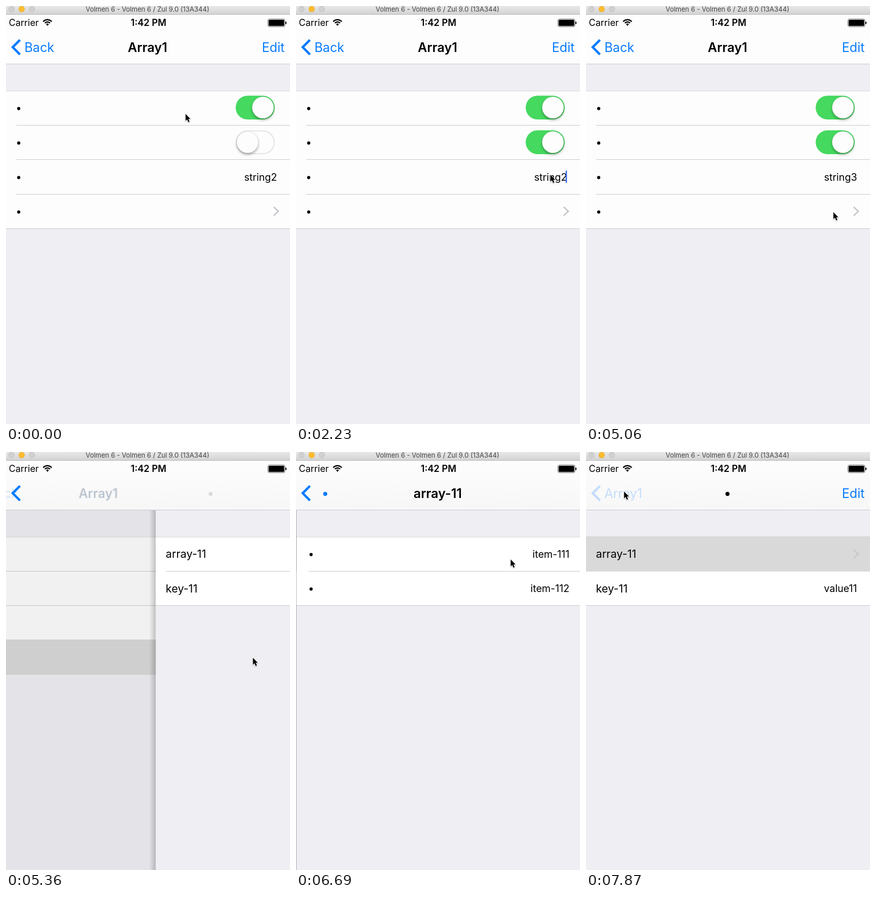
Recreate the animation shown at these times as an HTML page with a canvas. Size 558 px wide and 818 px high, loop 8 s.

```html
<!DOCTYPE html>
<html>
<head>
<meta charset="utf-8">
<style>
html, body { margin: 0; width: 100%; height: 100%; overflow: hidden; background: #eeeef3; }
canvas { display: block; }
</style>
</head>
<body>
<canvas id="stage" width="558" height="818"></canvas>
<script>
const c = document.getElementById('stage').getContext('2d');
const W = 558, H = 818, LOOP = 8000, STEP = 148.6;
const BLUE = '#0a7cff', LINE = '#c8c7cc', PICKED = '#d9d9d9';
const TOP = 166, ROW = 67.4;
const clamp = v => Math.max(0, Math.min(1, v));

// Pointer path: time, x, y
const PATH = [
  [0, 352, 211], [300, 375, 216], [700, 468, 256], [900, 490, 266], [1040, 492, 268],
  [1190, 495, 299], [1340, 500, 340], [1480, 501, 369], [1900, 501, 369], [2080, 500, 340],
  [2230, 499, 330], [3720, 499, 330], [4010, 520, 277], [4310, 533, 345], [4600, 524, 441],
  [4760, 510, 428], [4910, 492, 408], [5060, 485, 403], [5560, 484, 402], [5800, 448, 262],
  [5950, 436, 229], [6100, 421, 210], [6690, 421, 210], [6840, 330, 165], [6990, 150, 100],
  [7140, 74, 77], [8001, 74, 77]
];

const PAGES = [
  { title: 'Array1', back: 'Back', backX: 65.5, inset: 0 },
  { title: '•', back: 'Array1', backX: 73.2, inset: 0 },
  { title: 'array-11', back: '•', backX: 57, inset: 3.5 }
];

function rect(x, y, w, h, color) {
  c.fillStyle = color;
  c.fillRect(x, y, w, h);
}
function disc(x, y, r, color) {
  c.fillStyle = color;
  c.beginPath();
  c.arc(x, y, r, 0, 7);
  c.fill();
}
function line(points, color, width) {
  c.strokeStyle = color;
  c.lineWidth = width;
  c.beginPath();
  points.forEach(p => c.lineTo(...p));
  c.stroke();
}
function text(s, x, y, size, align = 'left', color = '#000', weight = 400) {
  c.font = `${weight} ${size}px Inter, Roboto, sans-serif`;
  c.textAlign = align;
  c.fillStyle = color;
  c.fillText(s, x, y);
}
function pill(x, y, w, h, r) {
  c.beginPath();
  c.roundRect(x, y, w, h, r);
}
function faded(alpha, draw) {
  c.save();
  c.globalAlpha *= clamp(alpha);
  if (alpha > 0) draw();
  c.restore();
}
function gradient(x0, y0, x1, y1, from, to) {
  const g = c.createLinearGradient(x0, y0, x1, y1);
  g.addColorStop(0, from);
  g.addColorStop(1, to);
  return g;
}

function toggle(y, on) {
  pill(452.5, y - 22, 74.5, 44.5, 22.2);
  c.fillStyle = '#fdfdfd';
  c.fill();
  c.strokeStyle = '#e3e3e3';
  c.lineWidth = 2;
  c.stroke();
  faded(on, () => {
    pill(451.3, y - 23.2, 76.7, 46.6, 23.3);
    c.fillStyle = '#45d95f';
    c.fill();
  });
  c.save();
  c.shadowColor = 'rgba(0,0,0,.28)';
  c.shadowBlur = 5;
  c.shadowOffsetY = 3.5;
  disc(474.5 + 30.3 * on, y, 21.3, '#fdfdfd');
  c.restore();
  c.strokeStyle = 'rgba(0,0,0,.13)';
  c.lineWidth = .8;
  c.beginPath();
  c.arc(474.5 + 30.3 * on, y, 21.3, 0, 7);
  c.stroke();
}

const value = (s, y) => text(s, 532.5, y + 7, 19.6, 'right');
const bullet = y => disc(25, y + 1.2, 3.1, '#000');
const arrow = y => line([[526, y - 8.5], [535, y], [526, y + 8.5]], '#c7c7cc', 2.8);

const CONTENT = [
  (ys, t) => {
    ys.forEach(bullet);
    toggle(ys[0] - .8, 1);
    toggle(ys[1] - .5, clamp((t - 1040) / 300));
    value(t < 2820 ? 'string2' : t < 3120 ? 'string' : 'string3', ys[2]);
    if (t > 2220 && t < 4000) rect(529.8, 322, 2.6, 24, '#3f6bf0');
    arrow(ys[3] - .2);
  },
  ys => {
    text('array-11', 19.5, ys[0] + 7.5, 21.6);
    text('key-11', 19.5, ys[1] + 7.5, 21.6);
    arrow(ys[0]);
    value('value11', ys[1]);
  },
  ys => {
    ys.forEach(bullet);
    value('item-111', ys[0]);
    value('item-112', ys[1]);
  }
];

function page(i, x, t) {
  const count = i ? 2 : 4;
  const picked = i == 0 && t > 5200 ? 3 : i == 1 && t > 6230 ? 0 : -1;
  const edge = k => Math.floor(TOP + ROW * k);
  c.save();
  c.translate(x, 0);
  rect(0, 113, W, H, '#eeeef3');
  rect(0, TOP, W, edge(count) - TOP, i ? '#fff' : '#fdfdfd');
  rect(0, TOP, W, 1, '#d9d9de');
  rect(0, edge(count), W, 1, LINE);
  c.translate(PAGES[i].inset, 0);
  for (let k = 1; k < count; k++) rect(20, edge(k), W, 1, LINE);
  if (picked >= 0) rect(-5, edge(picked) - 1, W + 5, ROW + 1.6, PICKED);
  CONTENT[i](Array.from({ length: count }, (_, k) => 199.5 + 67.5 * k), t);
  c.restore();
}

function label(s, x, color, weight) {
  if (s == '•') disc(x, 82, 4, color);
  else text(s, x, 89.5, 25.1, 'center', color, weight);
}

// q is the part of the upper page still off stage
function navBar(top, q, press, edit) {
  rect(0, 17, W, 96, top ? gradient(0, 17, 0, 113, '#fdfdfd', '#f7f7f7') : '#fdfdfd');
  rect(0, 113, W, 1, LINE);
  const now = PAGES[top], under = PAGES[top - 1];
  const shown = (1 - q) ** 2.8, gone = q ** 2.8;
  faded(press, () => {
    line([[27.4, 66.4], [13.2, 80.6], [27.4, 94.8]], BLUE, 4.6);
    const x = now.backX + (278 - now.backX) * q;
    faded(shown, () => label(now.back, x, BLUE, 400));
    if (under) faded(gone, () => label(under.back, under.backX - 150 * (1 - q), BLUE, 400));
  });
  faded(shown, () => label(now.title, 278 + 235 * q, '#000', 600));
  if (under) faded(gone, () => label(under.title, 278 - (278 - now.backX) * (1 - q), '#000', 600));
  faded(edit, () => text('Edit', 547.5, 89.5, 25.1, 'right', BLUE));
}

function chrome() {
  rect(0, 0, W, 17, gradient(0, 0, 0, 17, '#e8e8e8', '#d2d2d2'));
  rect(0, 16, W, 1, '#b5b5b5');
  ['#d0d0d0', '#fdbd2e', '#d0d0d0'].forEach((color, k) => {
    disc(10.8 + 20 * k, 6, 6, k == 1 ? '#e0a32a' : '#bdbdbd');
    disc(10.8 + 20 * k, 6, 5.3, color);
  });
  text('Volmen 6 - Volmen 6 / Zul 9.0 (13A344)', 278, 11, 13, 'center', '#444');
  text('Carrier', 5.5, 39.3, 18);
  text('1:42 PM', 280, 39.3, 18.2, 'center', '#000', 600);
  c.strokeStyle = '#000';
  c.lineWidth = 2.4;
  for (const r of [6.8, 11.2]) {
    c.beginPath();
    c.arc(81.5, 38, r, -Math.PI * .77, -Math.PI * .23);
    c.stroke();
  }
  c.fillStyle = '#000';
  c.beginPath();
  c.moveTo(81.5, 39);
  c.arc(81.5, 38, 3.6, -Math.PI * .77, -Math.PI * .23);
  c.fill();
  pill(514.5, 25.5, 33.5, 15, 3);
  c.strokeStyle = '#555';
  c.lineWidth = 1;
  c.stroke();
  pill(516, 27, 30.5, 12, 1.5);
  c.fill();
  pill(549, 30.5, 2, 5, 1);
  c.fill();
}

function pointer(t) {
  const i = PATH.findIndex(p => p[0] > t);
  const [t0, x0, y0] = PATH[i - 1], [t1, x1, y1] = PATH[i];
  const k = (t - t0) / (t1 - t0);
  c.save();
  c.translate(x0 + (x1 - x0) * k + .8, y0 + (y1 - y0) * k + .3);
  c.beginPath();
  [[0, 0], [0, 13.5], [3.1, 10.7], [5.3, 16], [7.8, 15], [5.5, 9.9], [9.5, 9.7]]
    .forEach(p => c.lineTo(...p));
  c.closePath();
  c.strokeStyle = '#fff';
  c.lineWidth = 1.6;
  c.shadowColor = 'rgba(0,0,0,.3)';
  c.shadowBlur = 2;
  c.shadowOffsetY = 1;
  c.stroke();
  c.shadowColor = 'transparent';
  c.fillStyle = '#000';
  c.fill();
  c.restore();
}

// Critically damped spring, settled after 470 ms
function spring(ms) {
  const z = Math.max(0, ms) / 50;
  return ms > 470 ? 1 : 1 - (1 + z) * Math.exp(-z);
}

function draw(t) {
  let top = 0, q = 0, edit = 1;
  for (const [start, i] of [[5270, 1], [6265, 2]]) {
    if (t < start) continue;
    top = i;
    q = 1 - spring(t - start);
    edit = q ? 1 - (1 - q) * 3 : 1;
  }
  if (t > 7394) {
    q = spring(t - 7394);
    edit = 1;
    if (q == 1) { top = 1; q = 0; }
  }
  const press = t < 7270 ? 1 : t < 7420 ? .25 : t < 7570 ? .6 : t < 7860 ? 1 : .22;

  if (q) {
    page(top - 1, -.3 * W * (1 - q), t);
    rect(0, 113, W, H, `rgba(0,0,0,${.1 * (1 - q)})`);
    const x = W * q;
    rect(x - 13, 114, 13, H, gradient(x - 13, 0, x, 0, 'rgba(0,0,0,0)', 'rgba(0,0,0,.2)'));
  }
  page(top, W * q, t);
  navBar(top, q, press, edit);
  chrome();
  if (t < 2820 || t > 3720) pointer(t);
}

function tick(now) {
  const t = now % LOOP;
  draw(Math.floor((t + 8) / STEP) * STEP);
  requestAnimationFrame(tick);
}
requestAnimationFrame(tick);
</script>
</body>
</html>
```
